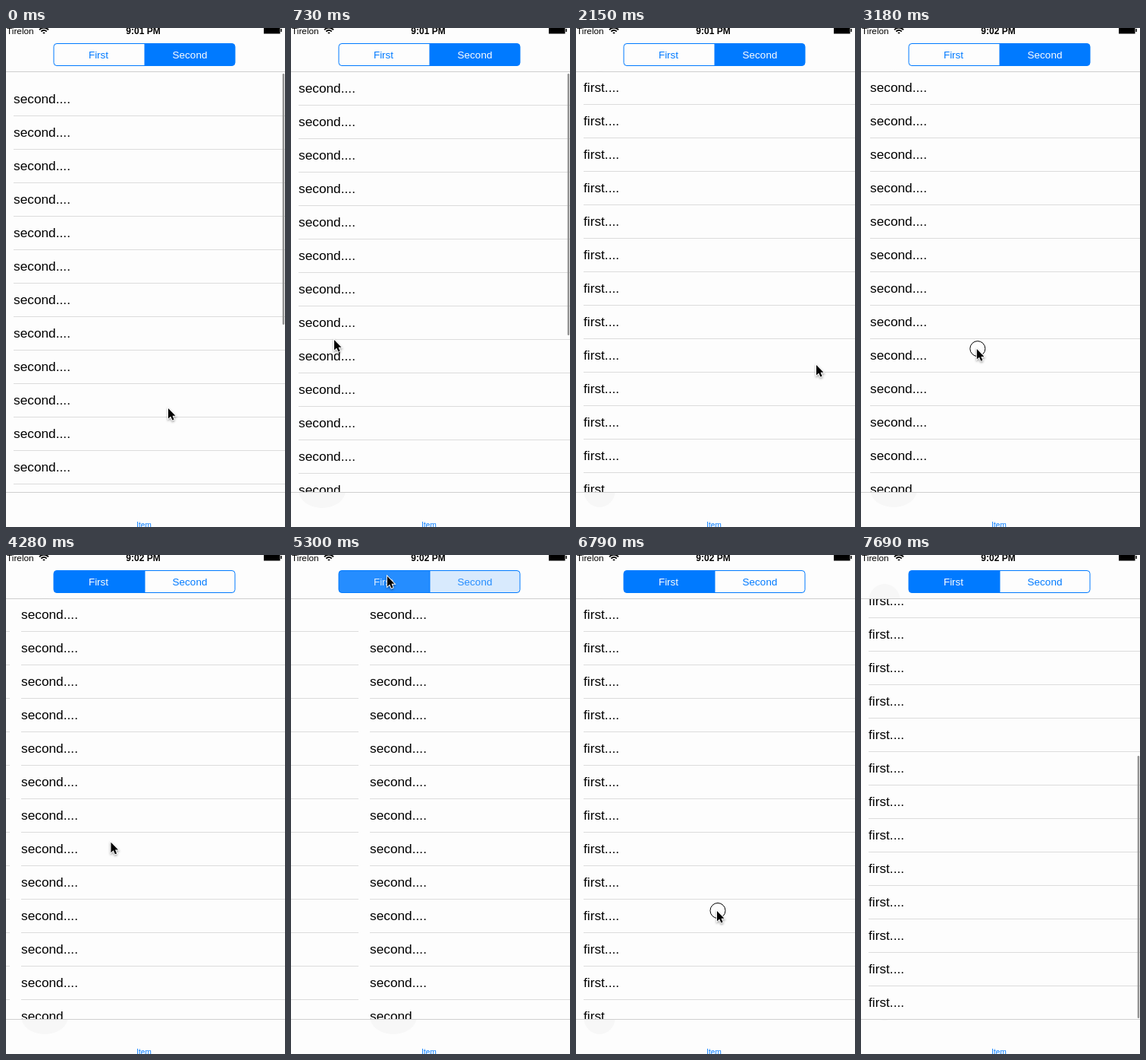
An HTML page with a canvas for the animation above (7790 ms loop, 368 by 656 pixels).

```html
<!DOCTYPE html>
<html lang="en">
<head>
<meta charset="utf-8">
<title>Segmented lists</title>
<style>
  html, body { margin: 0; width: 368px; height: 656px; overflow: hidden; background: #fdfdfd; }
  canvas { display: block; }
</style>
</head>
<body>
<canvas id="stage" width="368" height="656"></canvas>
<script>
const ctx = document.getElementById('stage').getContext('2d');
const LOOP = 7790, W = 368, H = 656;
const PAGE = 375, LEFT = -5, TOP = 57, BOTTOM = 610, ROW = 44, ROWS = 20;
const MAX_SCROLL = ROWS * ROW - (BOTTOM - TOP) - 1;
const BG = '#fdfdfd', BLUE = '#007aff', BLUE_RGB = [0, 122, 255], PALE_RGB = [253, 253, 253];
const SANS = '"Liberation Sans", Arial, sans-serif';

const clamp = u => Math.min(1, Math.max(0, u));
const smooth = u => u * u * (3 - 2 * u);
const out = u => 1 - (1 - u) ** 3;

// Gestures: a drag follows the finger, then coasts; a tap slides the pages by itself.
const DRAG = 0.45, HOLD = 100, TAP = 300;
const drag = (at, dur, from, to) => ({ at, dur, from, to, end: at + dur * DRAG });
const tap = (at, ...p) => ({ at, dur: TAP, from: p, to: p, end: at + 150, tap: true });

const turns = [
  drag(900, 1240, [57, 410], [317, 443]),
  drag(2420, 420, [317, 443], [140, 428]),
  drag(3165, 600, [151, 422], [330, 430]),
  drag(3885, 500, [330, 430], [140, 425]),
  tap(5203, 127, 28),
  tap(5860, 242, 32),
  tap(6400, 122, 32)
];
const pull = drag(6800, 700, [186, 468], [190, 270]);
const acts = [...turns, pull];

function travel(act, t, finger, goal) {
  const u = clamp((t - act.at) / act.dur);
  if (act.tap) return goal * smooth(u);
  if (u < DRAG) return finger * smooth(u / DRAG);
  return finger + (goal - finger) * out((u - DRAG) / (1 - DRAG));
}

// Turns alternate between showing the first list (PAGE) and the second (0).
function pageOffset(t) {
  return turns.reduce((x, act, i) =>
    x + travel(act, t, act.to[0] - act.from[0], i % 2 ? -PAGE : PAGE), 0);
}

// A tap fades the control at once; a swipe switches it when the page has settled.
function selection(t) {
  return turns.reduce((s, act, i) => {
    const u = act.tap ? (t - act.at) / 115 : (t - act.at - act.dur - 60) / 20;
    return s + (i % 2 ? -1 : 1) * clamp(u);
  }, 0);
}

function pointer(t) {
  let pos = [214, 500], free = 0;
  for (const act of [...acts, { at: LOOP, from: [385, 300] }]) {
    const mix = (a, b, u) => a.map((v, i) => v + (b[i] - v) * smooth(clamp(u)));
    if (t < act.at) return mix(pos, act.from, (t - free) / (0.8 * (act.at - HOLD - free)));
    if (t < act.end) return mix(act.from, act.to, (t - act.at) / (act.end - act.at));
    pos = act.to;
    free = act.end;
  }
  return pos;
}

const pressed = t => acts.some(a => t >= a.at - HOLD && t < (a.tap ? a.at : a.end));

function text(str, x, y, size, color = '#000', align = 'left', weight = '') {
  ctx.font = `${weight} ${size}px ${SANS}`;
  ctx.textAlign = align;
  ctx.fillStyle = color;
  ctx.fillText(str, x, y);
}

function box(x, y, w, h, color) {
  ctx.fillStyle = color;
  ctx.fillRect(x, y, w, h);
}

function list(label, x, scroll) {
  for (let i = 0; i < ROWS; i++) {
    const y = TOP + i * ROW - scroll;
    text(label, x + 15, y + 27, 17.3);
    box(x + 15, y + ROW - 1, PAGE - 15, 1, '#dcdcdc');
  }
}

// Faint blur of labels passing under the translucent bars.
function blurs(x, width, scroll) {
  ctx.fillStyle = '#f7f7f7';
  for (let i = 0; i < ROWS; i++) {
    const y = TOP + i * ROW + 22 - scroll;
    if (y < 49 || y > 618) continue;
    ctx.beginPath();
    ctx.ellipse(x + 15 + width / 2, y, width / 2, 23, 0, 0, 7);
    ctx.fill();
  }
}

function indicator(scroll, alpha) {
  const y = 60 + Math.max(0, scroll) / MAX_SCROLL * 204;
  ctx.globalAlpha = alpha;
  ctx.fillStyle = '#929292';
  ctx.beginPath();
  ctx.roundRect(364.7, y, 2.5, 345 + Math.min(0, scroll), 1.25);
  ctx.fill();
  ctx.globalAlpha = 1;
}

function status(t) {
  text('Tirelon', 1, 8, 11.8);
  ctx.strokeStyle = '#000';
  ctx.lineWidth = 1.8;
  for (const r of [1.5, 5, 8.2]) {
    ctx.beginPath();
    ctx.arc(50, 8, r, -Math.PI * 0.76, -Math.PI * 0.24);
    ctx.stroke();
  }
  text(t < 2250 ? '9:01 PM' : '9:02 PM', 181, 8, 12, '#000', 'center', 'bold');
  box(340, -2, 21.5, 9.5, '#000');
  box(362.3, 1, 1.5, 4, '#000');
}

function segments(sel) {
  const blend = (a, b) => `rgb(${a.map((v, i) => Math.round(v + (b[i] - v) * sel))})`;
  const on = blend(PALE_RGB, BLUE_RGB), off = blend(BLUE_RGB, PALE_RGB);
  ctx.beginPath();
  ctx.roundRect(63, 20.5, 239, 29, 4);
  ctx.save();
  ctx.clip();
  box(62, 20, 121, 30, on);
  box(183, 20, 120, 30, off);
  box(182.5, 20, 1, 30, BLUE);
  ctx.restore();
  ctx.strokeStyle = BLUE;
  ctx.lineWidth = 1;
  ctx.stroke();
  text('First', 122, 39.5, 13.5, off, 'center');
  text('Second', 242.5, 39.5, 13.5, on, 'center');
}

function cursor(t) {
  const [x, y] = pointer(t);
  ctx.save();
  ctx.translate(x, y);
  if (pressed(t)) {
    ctx.beginPath();
    ctx.arc(1, -0.5, 10, 0, 7);
    ctx.strokeStyle = '#000';
    ctx.lineWidth = 1;
    ctx.stroke();
  }
  const arrow = new Path2D('M0 0V13.5L3.2 10.6L5.4 15.6L7.6 14.7L5.5 9.8H9.5Z');
  ctx.shadowColor = 'rgba(0,0,0,0.4)';
  ctx.shadowBlur = 3;
  ctx.shadowOffsetY = 1.5;
  ctx.strokeStyle = '#fff';
  ctx.lineWidth = 1.8;
  ctx.stroke(arrow);
  ctx.shadowColor = 'transparent';
  ctx.fillStyle = '#000';
  ctx.fill(arrow);
  ctx.restore();
}

function draw(t) {
  const secondX = LEFT + Math.round(pageOffset(t)), firstX = secondX - PAGE;
  const secondY = Math.round(-15 * Math.exp(-t / 270));
  const firstY = Math.round(travel(pull, t, pull.from[1] - pull.to[1], MAX_SCROLL));

  box(0, 0, W, H, BG);
  blurs(firstX, 42, firstY);
  blurs(secondX, 62, secondY);

  ctx.save();
  ctx.beginPath();
  ctx.rect(0, TOP, W, BOTTOM - TOP);
  ctx.clip();
  box(0, TOP, W, BOTTOM - TOP, BG);
  list('first....', firstX, firstY);
  list('second....', secondX, secondY);
  indicator(secondY, clamp((1080 - t) / 240));
  indicator(firstY, clamp((t - pull.at) / 60));
  ctx.restore();

  box(0, TOP, W, 1, '#cfcfcf');
  box(0, BOTTOM, W, 1, '#cfcfcf');
  status(t);
  segments(selection(t));
  text('Item', 182, 656.5, 10, BLUE, 'center');
  cursor(t);
}

const start = performance.now();
function tick() {
  draw((performance.now() - start) % LOOP);
  requestAnimationFrame(tick);
}
tick();
</script>
</body>
</html>
```
